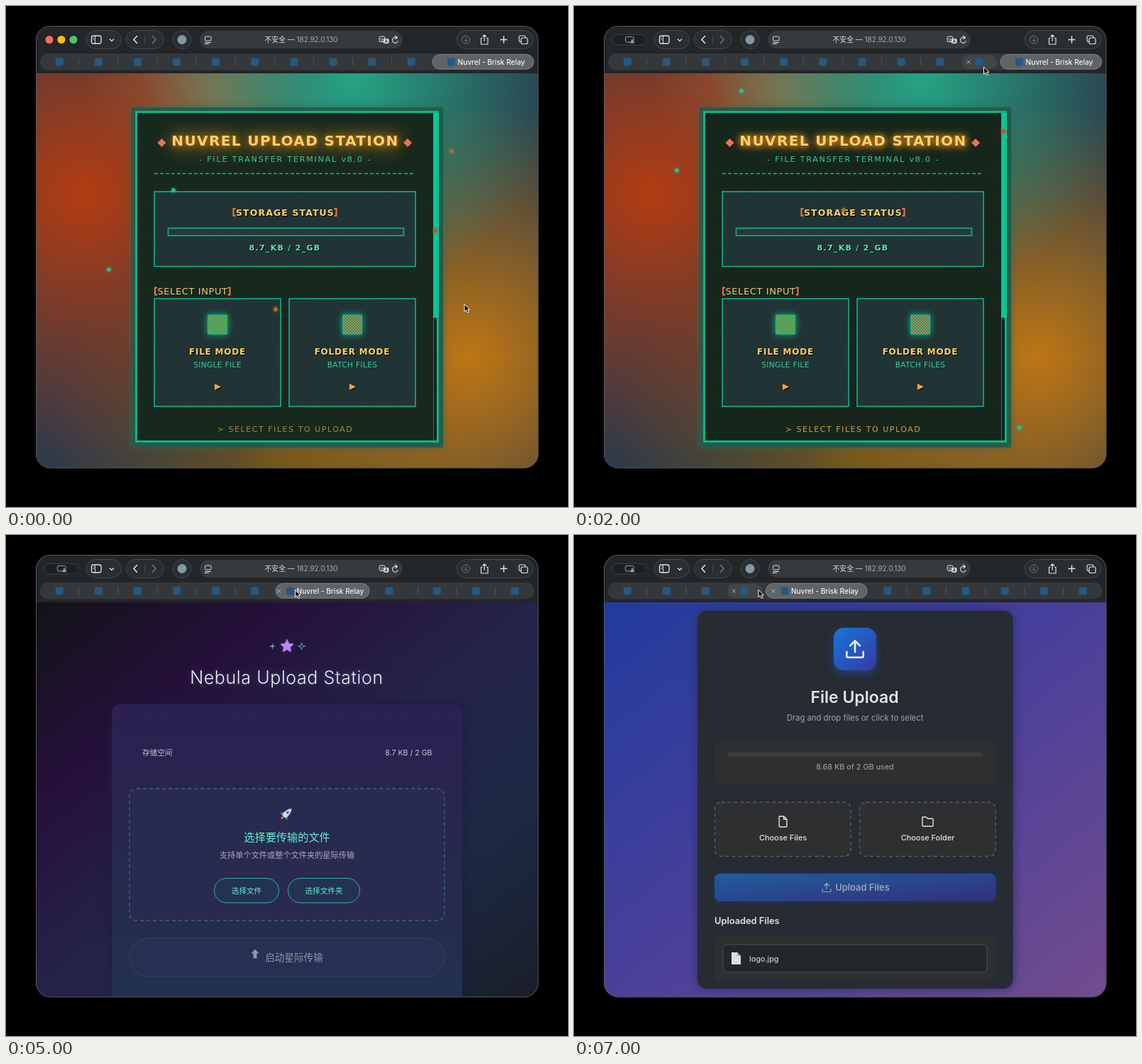
An HTML page for the animation above (8 s loop, 792 by 707 pixels).

```html
<!DOCTYPE html>
<html lang="zh-CN">
<head>
<meta charset="utf-8">
<title>Upload pages</title>
<style>
  html, body { margin: 0; width: 100%; height: 100%; overflow: hidden; background: #000 }
  svg { display: block; font-family: Inter, "Noto Sans CJK SC", sans-serif }
  .wide { font-family: "DejaVu Sans", sans-serif }
</style>
</head>
<body>
<svg id="stage" width="792" height="707" viewBox="0 0 792 707"></svg>
<script>
const stage = document.getElementById('stage');

// Shapes; boxes are given by their two corners.
const box = (x, y, x2, y2, fill, more = '') =>
  `<rect x="${x}" y="${y}" width="${x2 - x}" height="${y2 - y}" fill="${fill}" ${more}/>`;
const edge = (color, width = 1, r = 0) => `stroke="${color}" stroke-width="${width}" rx="${r}"`;
const dashed = (color, r) => edge(color, 1.4, r) + ' stroke-dasharray="5 4"';
const line = (d, color, width = 1, more = '') =>
  `<path d="${d}" fill="none" stroke="${color}" stroke-width="${width}" ${more}/>`;
const dot = (x, y, r, fill, more = '') => `<circle cx="${x}" cy="${y}" r="${r}" fill="${fill}" ${more}/>`;
const glow = (color, r = 4) => `style="filter:drop-shadow(0 0 ${r}px ${color})"`;
const neon = (color, r = 3) => `style="filter:drop-shadow(0 0 ${r / 2}px ${color}) drop-shadow(0 0 ${r}px ${color})"`;
const icon = (x, y, scale, d, color, width = 1.2) =>
  `<path transform="translate(${x} ${y}) scale(${scale})" d="${d}" fill="none" stroke="${color}"
    stroke-width="${width / scale}" stroke-linecap="round" stroke-linejoin="round"/>`;
const text = (x, y, str, size, fill, { anchor = 'middle', weight = 400, space = 0, more = '' } = {}) =>
  `<text x="${x}" y="${y}" font-size="${size}" fill="${fill}" text-anchor="${anchor}"
    font-weight="${weight}" letter-spacing="${space}" ${more}>${str}</text>`;
const left = { anchor: 'start' };

const gradient = (id, ...colors) => `<linearGradient id="${id}" x2="1" y2="1">${colors.map((c, i) =>
  `<stop offset="${i / (colors.length - 1)}" stop-color="${c}"/>`).join('')}</linearGradient>`;
const blob = (id, color, x, y, r) =>
  `<radialGradient id="${id}" gradientUnits="userSpaceOnUse" cx="${x}" cy="${y}" r="${r}">
    <stop stop-color="${color}"/><stop offset="1" stop-color="${color}" stop-opacity="0"/></radialGradient>`;
const pattern = (id, size, body) =>
  `<pattern id="${id}" width="${size}" height="${size}" patternUnits="userSpaceOnUse">${body}</pattern>`;
const checker = (id, a, b) => pattern(id, 4, box(0, 0, 4, 4, a) + box(0, 0, 2, 2, b) + box(2, 2, 4, 4, b));

const defs = `<defs>
  <clipPath id="window">${box(42, 28, 750, 652, '#fff', 'rx="20"')}</clipPath>
  <clipPath id="panel">${box(79, 120, 714, 603, '#fff')}</clipPath>
  ${blob('red', '#b33c12', 110, 265, 390)}${blob('teal', '#25a584', 490, 100, 300)}
  ${blob('amber', '#bd7614', 655, 495, 360)}${blob('gold', '#6e541c', 400, 620, 340)}
  ${blob('olive', '#8a7a58', 290, 120, 180)}
  ${pattern('scan', 3, box(0, 0, 3, 1, '#000'))}
  ${pattern('hatch', 4, line('M0 0L4 4M0 4L4 0', '#263d3d', .7))}
  ${checker('greenCheck', '#1fa56e', '#8f9f40')}${checker('orangeCheck', '#2f8f6a', '#b58d4a')}
  ${gradient('grey', '#2b2f30', '#323537', '#38393c')}
  ${gradient('space', '#121318', '#25103a', '#252349', '#1c2944', '#1b1e28')}
  ${gradient('violet', '#213b9d', '#4a409a', '#724c8e')}
  ${gradient('blue', '#0769bb', '#084a93')}${gradient('navy', '#224f8f', '#1d3c6c')}
  ${gradient('indigo', '#1876d8', '#3639a4')}${gradient('dusk', '#225c9f', '#31307a')}
  <linearGradient id="glass" x2="0" y2="1"><stop stop-color="#2b2052"/>
    <stop offset=".5" stop-color="#27284d"/><stop offset="1" stop-color="#223250"/></linearGradient>
</defs>`;

const UPLOAD = 'M-6 2V5Q-6 6 -5 6H5Q6 6 6 5V2M0 2V-6M-3.5 -2.5L0 -6L3.5 -2.5';
const FILE = 'M-5 -7H1L5 -3V5Q5 7 3 7H-3Q-5 7 -5 5ZM1 -7V-3H5';
const FOLDER = 'M-7 -6H-2L0 -4H6Q7 -4 7 -3V5Q7 6 6 6H-6Q-7 6 -7 5Z';

function retroPage(step) {
  const green = '#0db58a', yellow = '#ffd166', coral = '#ef7355';
  const wide = (weight, space, fx = '') => ({ weight, space, more: `class="wide" ${fx}` });
  const shade = 'style="filter:drop-shadow(1px 1px 0 #000)"';
  const bracket = (x, y, dir) => line(`M${x + 3 * dir} ${y - 5}H${x}V${y + 5}H${x + 3 * dir}`, coral, 2);
  const diamond = (x, y, r, fill, fx = '') => `<path d="M${x} ${y - r}l${r} ${r}l${-r} ${r}l${-r} ${-r}z" fill="${fill}" ${fx}/>`;
  const mode = (x, fill, name, hint) => {
    const c = x + 89;
    return box(x, 413, x + 178, 565, '#1d2e30', edge(green, 1.6)) + box(x + 1, 414, x + 177, 564, 'url(#hatch)')
      + box(c - 13.5, 436, c + 13.5, 463, `url(#${fill})`, `stroke="#1bb883" ${glow('#10b58a', 5)}`)
      + text(c, 492, name, 12, yellow, wide(700, .8, shade))
      + text(c, 510, hint, 10.5, '#30cf98', wide(400, .4))
      + `<path d="M${c - 4} 533l9 4.5l-9 4.5z" fill="#ff9f43" ${shade}/>`;
  };
  const specks = [[236, 260, '#12c99b'], [145, 372, '#12c99b'], [628, 205, '#b5701e'],
    [605, 317, '#cf4a2e'], [380, 428, '#b5701e']].map(([x, y, color]) => {
    y -= 70 * step;
    if (y < 100) { y += 530; color = '#12c99b'; }
    return diamond(x, y, 3.5, color, glow(color, 2));
  });
  return box(42, 95, 750, 652, '#2b3a4b')
    + ['gold', 'olive', 'red', 'amber', 'teal'].map(id => box(42, 95, 750, 652, `url(#${id})`)).join('')
    + box(177, 143, 616, 623, '#28574a', `fill-opacity=".85" ${glow('#2b6a52', 4)}`)
    + box(183.5, 149.5, 608.5, 614.5, '#18291e', edge('#06b88a', 3))
    + box(185, 151, 602, 613, 'url(#scan)', `opacity="${step ? .25 : .08}"`)
    + box(602, 151, 607, 613, '#14231b') + line('M602.5 440V613', '#0b8163') + box(602, 151, 610, 440, '#08c795')
    + diamond(219.5, 193, 6, coral) + diamond(566, 193, 6, coral)
    + text(393.5, 197, 'NUVREL UPLOAD STATION', 20, yellow, wide(700, 1.4,
        `style="filter:drop-shadow(1.5px 1.5px 0 #9c4a1c) drop-shadow(0 0 4px #a06a18) drop-shadow(0 0 ${step ? 5 : 12}px #a87418)"`))
    + text(393.5, 220, '- FILE TRANSFER TERMINAL v8.0 -', 11, '#2fcf9a', wide(400, 1.85))
    + line('M209 236.5H577', '#12b78b', 1.6, 'stroke-dasharray="5 3"')
    + box(209, 262, 577, 367.5, '#1d2e30', edge(green, 1.6)) + box(210, 263, 576, 367, 'url(#hatch)')
    + bracket(320.5, 291, 1) + bracket(465.5, 291, -1)
    + text(393.5, 295.5, 'STORAGE STATUS', 12.5, yellow, wide(700, 1.1, shade))
    + box(228.5, 313.5, 560.5, 324, '#2a3440', edge(green, 1.6))
    + text(393, 345, '8.7_KB / 2_GB', 11, '#4ff0b8', wide(700, 1.3, shade))
    + bracket(210, 402.5, 1) + bracket(315.5, 402.5, -1)
    + text(263, 407, 'SELECT INPUT', 13, '#f0c96c', wide(400, .6))
    + mode(209, 'greenCheck', 'FILE MODE', 'SINGLE FILE') + mode(399, 'orangeCheck', 'FOLDER MODE', 'BATCH FILES')
    + text(393.5, 601, '> SELECT FILES TO UPLOAD', 11, step ? '#d99c43' : '#b1843c', wide(400, 1.55))
    + specks.join('');
}

function officePage() {
  const choice = (x, d, name, hint) => box(x, 384.5, x + 185.5, 503.5, '#2a2c2e', dashed('#55585a', 9))
    + box(x + 75, 403, x + 110.5, 438.5, 'url(#blue)', 'rx="8"') + icon(x + 93, 421, 1.1, d, '#fff', 1.5)
    + text(x + 93, 464, name, 11.7, '#ececec', { weight: 500 }) + text(x + 93, 482, hint, 10, '#9c9d9f');
  return box(42, 95, 750, 652, 'url(#grey)')
    + box(175, 143, 618, 596, '#212629', 'rx="12" style="filter:drop-shadow(0 5px 10px #24282a)"')
    + box(324, 173, 366, 215, 'url(#blue)', `rx="10" ${glow('#17406b', 5)}`)
    + text(422.5, 191.5, 'Nuvrel', 21, '#62b5fb', { weight: 600 })
    + text(422.5, 211, '企业文件上传服务', 11.1, '#a8aaab') + line('M204 233H588', '#4a4d4f')
    + box(204.5, 263.5, 588, 359.5, '#2a2c2e', edge('#46494b', 1, 9))
    + text(222, 295, '存储空间使用情况', 11.75, '#e4e4e4', { anchor: 'start', weight: 500 })
    + box(222, 311, 570, 317, '#3b3d3f', 'rx="3"')
    + text(358, 338, '8.7_KB', 10.8, '#5fb0f5', { anchor: 'start', weight: 500 })
    + text(400, 338, '/', 10.8, '#a8aaab') + text(434.5, 338, '2_GB', 10.8, '#a8aaab', { anchor: 'end' })
    + choice(204, FILE, '选择文件', '选择单个文件上传') + choice(402.5, FOLDER, '选择文件夹', '批量上传整个文件夹')
    + box(204, 528, 588.5, 573, 'url(#navy)', 'rx="8" style="filter:drop-shadow(0 3px 7px #1d3047)"')
    + icon(366, 551, 1, UPLOAD, '#aeb9c8') + text(408, 556, '开始上传', 13.1, '#aeb9c8', { weight: 500 });
}

function spacePage() {
  const mint = '#62efd0';
  const star = (x, y, outer, inner, points, attrs) => `<path ${attrs} d="M${Array.from({ length: points * 2 }, (_, i) => {
    const r = i % 2 ? inner : outer, a = Math.PI * i / points;
    return `${(x + r * Math.sin(a)).toFixed(1)} ${(y - r * Math.cos(a)).toFixed(1)}`;
  }).join('L')}Z"/>`;
  const pill = (x, x2, name) => box(x, 484.5, x2, 519, '#233252', edge('#32b0a3', 1, 17.2))
    + text((x + x2) / 2, 506, name, 10.6, mint, { weight: 500 });
  return box(42, 95, 750, 652, 'url(#space)')
    + star(375.5, 157, 5, 1.4, 4, 'fill="#4fa5ac"') + star(416.5, 157, 5, 1.6, 4, 'fill="none" stroke="#4fa5ac"')
    + star(396, 157, 9.5, 4.5, 5, `fill="#b48af2" stroke="#b48af2" stroke-linejoin="round" ${glow('#4a2f79', 3)}`)
    + text(395.5, 210, 'Nebula Upload Station', 25, '#eeeef5', { weight: 300, space: .6, more: glow('#35456b', 5) })
    + box(149, 239, 643, 670, 'url(#glass)', `rx="12" ${glow('#1c1a3a', 8)}`)
    + text(192, 311, '存储空间', 10.6, '#c6c4d2', left)
    + text(600.5, 311, '8.7 KB / 2 GB', 10.6, '#c6c4d2', { anchor: 'end' })
    + box(174, 358, 618, 544, '#292a50', dashed('#3c6375', 10))
    + `<g transform="translate(395.5 393) rotate(45)">
        <path d="M-4 1l-3 5h14l-3 -5z" fill="#2a93a0"/>
        <path d="M0 -10Q6 -3 3 6H-3Q-6 -3 0 -10Z" fill="#d4d7dc"/>
        <path d="M-2 7h4l-2 5z" fill="#ee7a35"/>${dot(0, -2, 1.8, '#33607c')}</g>`
    + text(396, 431.5, '选择要传输的文件', 15.2, mint, { weight: 500 })
    + text(396, 456, '支持单个文件或整个文件夹的星际传输', 11.2, '#a9a8bb')
    + pill(293.5, 384.5, '选择文件') + pill(397.5, 498.5, '选择文件夹')
    + box(174, 569, 618, 623, '#263052', edge('#344461', 1, 27))
    + '<path d="M351 584.5l5.5 6h-3v7h-5v-7h-3z" fill="#8f94aa"/>'
    + text(406, 601, '启动星际传输', 13.6, '#8f94aa', { weight: 500 });
}

function neonPage() {
  const cyan = '#43eef0', pink = '#ff2b96', rim = '#1c9296', halo = '#0a9aa6';
  const type = (weight, space, anchor, color, r) =>
    ({ weight, space, anchor, more: `class="wide" ${color ? neon(color, r) : ''}` });
  const rows = [['TARGET_DIRECTORY:', 'SECURE_VAULT'], ['STORAGE_USED:', '8.7_KB'], ['TOTAL_CAPACITY:', '2_GB'],
    ['AVAILABLE_SPACE:', '2_GB'], ['SECURITY_LEVEL:', 'MAXIMUM']].map(([key, value], i) => {
    const y = 284 + 22.25 * i, last = i == 4;
    return text(115, y, key, 11, cyan, type(700, .3, 'start', halo))
      + text(678, y, value, last ? 10.5 : 12, last ? pink : '#d5dede', type(last ? 700 : 400, last ? 0 : .85, 'end', last && '#a01060'))
      + line(`M115 ${y + 6.5}H678`, '#142629');
  });
  return box(42, 95, 750, 652, '#070d0f')
    + line('M149.5 95V652M219.5 95V652M290.5 95V652M42 647.5H750', '#0e1b1d')
    + box(78, 119, 715, 604, '#0c3d40', 'style="filter:blur(16px)"')
    + box(78, 119, 715, 604, '#010203')
    + `<g clip-path="url(#panel)">`
    + line('M78 119H715V604H78Z', '#06292b', 24, 'style="filter:blur(9px)"')
    + box(103, 257, 690, 392, '#000', edge(rim)) + box(103, 434.5, 690, 496.5, '#000', edge(rim))
    + box(103, 527, 690, 640, '#000', edge(rim))
    + text(103, 159, '&gt;&gt; NEURAL LINK ESTABLISHED &lt;&lt;', 13, cyan, type(700, .5, 'start', halo, 4))
    + dot(560, 154, 4, '#3cc41e', glow('#2a8a18', 2))
    + text(690, 158, 'CONNECTION SECURE', 10.5, '#39c42c', type(400, .25, 'end')) + line('M103 177H690', rim)
    + text(397, 222, 'DATA UPLOAD PROTOCOL', 24, pink, type(700, 2.2, 'middle', '#c2146f', 6))
    + rows.join('')
    + box(115.5, 447, 678.5, 462, '#0d2427', edge(rim))
    + text(396, 480.5, '0% UTILIZED', 11, cyan, type(700, 0, 'middle'))
    + text(396.5, 552.5, '[INPUT_SELECTION_MATRIX]', 12, '#ea2889', type(700, .3, 'middle', '#80104a'))
    + text(115, 579, '[SINGLE_FILE_MODE]', 10, cyan, type(700, 0, 'start', halo, 2))
    + box(115.5, 589, 677.5, 640, '#081415', edge(rim))
    + dot(137, 609, 9, '#1b8d92', 'style="filter:blur(4px)"') + '</g>'
    + box(78, 119.5, 715, 604, 'none', edge('#1fb0b0', 1.6));
}

function cleanPage() {
  const pale = '#e4e3de';
  const choice = (x, d, name) => box(x, 377, x + 191.5, 453.5, '#2e2f31', dashed('#5a5b5d', 9))
    + icon(x + 96, 404.5, 1.08, d, pale, 1.4) + text(x + 96, 431, name, 10.9, pale, { weight: 500 });
  return box(42, 95, 750, 652, 'url(#violet)')
    + box(174, 107, 618.5, 640, '#272b32', `rx="13" ${glow('#2b2c6a', 7)}`)
    + box(366, 131, 426, 191, 'url(#indigo)', 'rx="14" style="filter:drop-shadow(0 4px 6px #1f447e)"')
    + icon(396, 161, 1.95, UPLOAD, '#f2f2f2', 2.6)
    + text(395.5, 237, 'File Upload', 23, pale, { weight: 600 })
    + text(396, 261.5, 'Drag and drop files or click to select', 11.3, '#a5a6a8')
    + box(198, 290, 594, 352, '#2e2f31', 'rx="9"') + box(216, 307, 576, 313, '#3b3c3e', 'rx="3"')
    + text(396, 331, '8.68 KB of 2 GB used', 10.8, '#a5a6a8')
    + choice(198.5, FILE, 'Choose Files') + choice(402.5, FOLDER, 'Choose Folder')
    + box(198, 478, 594.5, 517, 'url(#dusk)', `rx="8" ${glow('#20375e', 4)}`)
    + icon(356, 497.5, 1, UPLOAD, '#98a2b8') + text(406.5, 502, 'Upload Files', 12.9, '#98a2b8', { weight: 600 })
    + text(198, 549, 'Uploaded Files', 12.8, pale, { anchor: 'start', weight: 600 })
    + box(198, 566, 594, 629, '#2e2f31', 'rx="9"') + box(210, 578, 582, 617, '#22272a', edge('#4c4e50', 1, 6))
    + '<path d="M222 589h8l5 5v12h-13z" fill="#dedede"/><path d="M230 589v5h5z" fill="#a9a9a9"/>'
    + text(247, 602, 'logo.jpg', 10.9, pale, left);
}

function toolbar(step) {
  const ink = '#dfe1e2', dim = '#75797c', rim = edge('#43474a', 1, 13.5), fill = '#2a2e31';
  const lights = ['#ff6b55', '#fdc00f', '#4cc46c'].map((c, i) => dot(61 + 17 * i, 47.5, 5.5, c)).join('');
  const sharing = box(54, 40.5, 102, 55, '#1c2022', edge('#3c4043', 1, 7.2))
    + box(72.5, 43.5, 84, 51, 'none', edge('#9b9ea0', 1, 1.5)) + dot(82, 48.5, 1.6, '#9b9ea0') + box(79.5, 50, 85, 52.5, '#9b9ea0', 'rx="1"');
  return box(42, 28, 750, 95, '#222629') + (step ? sharing : lights)
    + box(113, 34.5, 162.5, 60.5, fill, rim) + box(169, 34.5, 222.5, 60.5, fill, rim)
    + box(635, 34.5, 743, 60.5, fill, rim)
    + box(120.5, 42, 134, 53, 'none', edge(ink, 1.3, 2.5)) + line('M125.5 42V53M122.5 45H124M122.5 47.5H124', ink)
    + line('M146 46.5l3 3l3 -3', ink, 1.3) + line('M185 42l-5 5.5l5 5.5', ink, 1.6)
    + line('M195.5 41V54', '#43474a') + line('M206 42l5 5.5l-5 5.5', dim, 1.4)
    + dot(248, 47.5, 13, fill, 'stroke="#43474a"') + dot(248, 47.5, 6.5, '#8299a3')
    + box(273, 35, 559, 60, '#363a3d', 'rx="12.5"')
    + box(280.5, 43, 289, 49, 'none', edge(ink, 1, 1.5)) + line('M280 51.5H289M280 53.5H286', ink)
    + text(416, 51, '不安全 — <tspan fill="#a9acae">182.92.0.130</tspan>', 9.9, ink)
    + box(526, 43, 534, 50.5, 'none', edge(ink, 1, 2)) + text(530, 49.5, '文', 6, ink)
    + box(532, 46, 539.5, 53, ink, 'rx="2"') + text(535.8, 52, 'A', 6, '#363a3d', { weight: 700 })
    + line('M551.5 45.5A4 4 0 1 0 552.5 49M548 42l3.5 2.5l-3 2.5', ink, 1.1)
    + dot(648, 47.5, 5.5, 'none', `stroke="${dim}"`) + line('M648 44.5V50M645.8 48l2.2 2.2l2.2 -2.2', dim)
    + line('M671.5 45.5H669.5V54H679V45.5H677M674.2 50V41M671.5 43.5l2.7 -2.7l2.7 2.7', ink, 1.2)
    + line('M696.5 47.5H706.5M701.5 42.5V52.5', ink, 1.5)
    + box(723, 42, 732, 50.5, 'none', edge(ink, 1.2, 2)) + box(726, 45, 735, 53.5, fill, edge(ink, 1.2, 2));
}

function tabs({ sel, hover, squeeze }) {
  const pitch = 55.1, close = (x, c = '#b3b6b8') => line(`M${x - 2.5} 76.5l5 5m0 -5l-5 5`, c);
  const favicon = x => box(x - 5.5, 73.5, x + 5.5, 84.5, '#27587f', 'rx="2"');
  const quiet = i => i == sel || i == hover;
  let out = box(48, 67, 744.5, 90.5, '#34383a', 'rx="11.7"');
  for (let i = 0; i < 11; i++) {
    if (i == sel) continue;
    const closing = squeeze && i == sel + 1;
    const x = i < sel ? 75.3 + pitch * i : closing ? 540 : 717.3 - pitch * (10 - i);
    if (i == hover) out += box(x - 25, 69, x + 25, 89, '#414547', 'rx="10"') + close(x - 15.3);
    out += favicon(x);
    if (i < 10 && !quiet(i) && !quiet(i + 1))
      out += line(`M${closing ? 580.5 : x + 27.5} 73V84`, '#505456');
  }
  const x = squeeze ? 380 : 50 + pitch * sel, width = squeeze ? 132 : 142.5, shift = squeeze ? -6 : 0;
  out += box(x, 68.5, x + width, 89, '#616466', edge('#7e8183', 1, 10.2));
  if (sel < 10) out += close(x + 10.5 + shift, sel == 9 ? '#7b7e80' : '#b3b6b8');
  return out + favicon(x + 26.5 + shift)
    + text(x + 35.5 + shift, 82.5, 'Nuvrel - Brisk Relay', 10.1, '#f3f4f4', { anchor: 'start', weight: 500 });
}

const cursor = ([x, y]) => `<path transform="translate(${x} ${y})" fill="#000" stroke="#fff"
  d="M0 0V10.2L2.4 8L4.1 11.8L6 11L4.3 7.3H7.4Z"/>`;

// One entry per second.
const steps = [
  { page: retroPage, sel: 10, at: [646, 421] },
  { page: retroPage, sel: 10, at: [612, 254] },
  { page: retroPage, sel: 10, hover: 9, at: [577.5, 86] },
  { page: officePage, sel: 9, hover: 8, at: [536, 79.5] },
  { page: officePage, sel: 8, at: [472, 79] },
  { page: spacePage, sel: 6, squeeze: true, at: [407.5, 77.5] },
  { page: neonPage, sel: 5, at: [353.5, 77] },
  { page: cleanPage, sel: 4, hover: 3, at: [260, 77.5] },
];

let shown = -1;
function tick() {
  const now = Math.floor(performance.now() / 1000) % steps.length;
  if (now != shown) {
    shown = now;
    const step = steps[now];
    stage.innerHTML = defs + `<g clip-path="url(#window)">${step.page(now)}${toolbar(now)}${tabs(step)}</g>`
      + box(42.5, 28.5, 750, 652, 'none', edge('#55585a', 1, 20)) + cursor(step.at);
  }
  requestAnimationFrame(tick);
}
tick();
</script>
</body>
</html>
```
